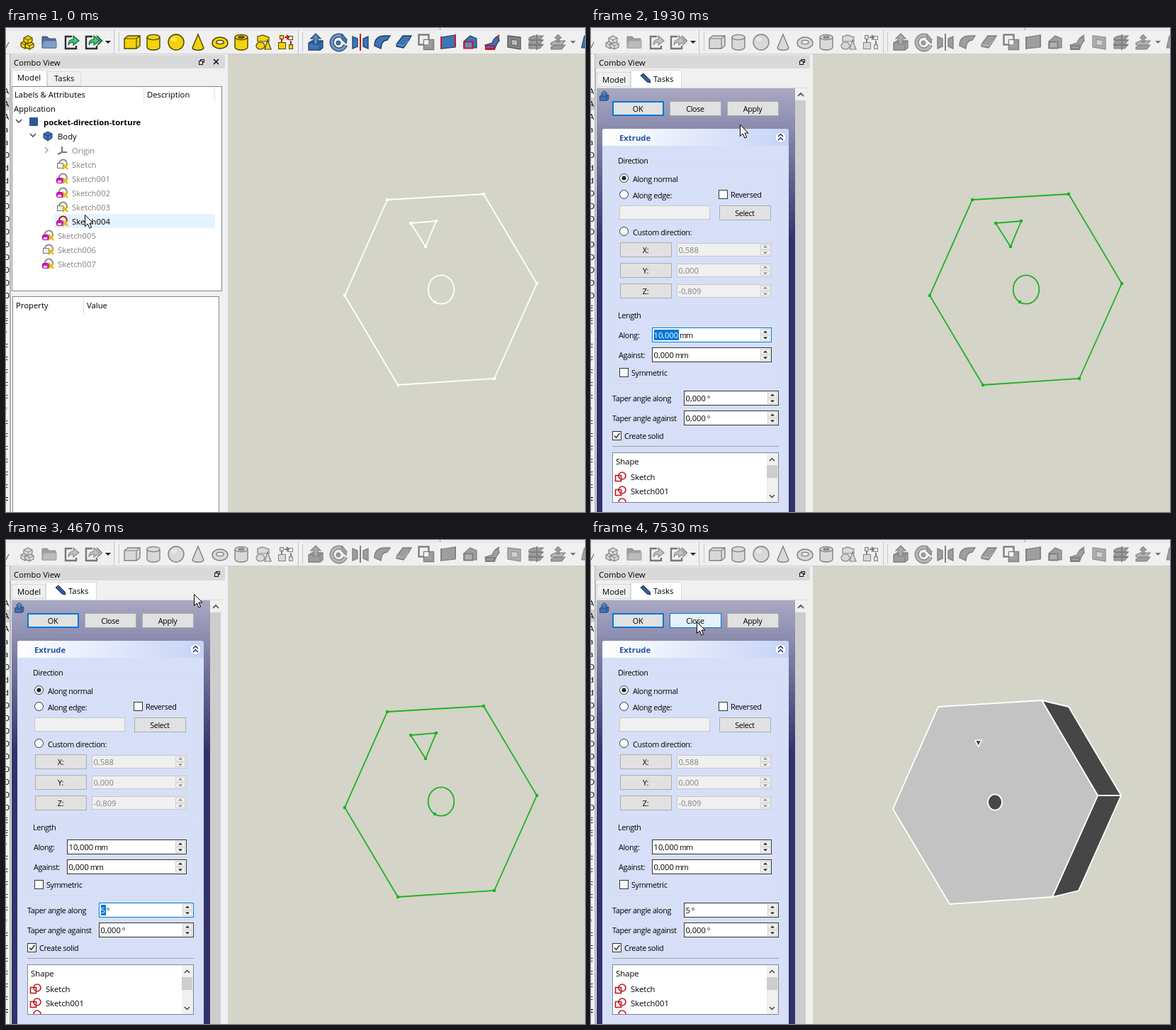
These frames come from a looping animation (817x682 px, 8 s). An HTML page:

```html
<!DOCTYPE html>
<html lang="en">
<head>
<meta charset="utf-8">
<title>Extrude with taper</title>
<style>
html, body { margin: 0; width: 100%; height: 100%; overflow: hidden; background: #f0f0f0; }
svg { display: block; width: 100%; height: 100%; }
text { font: 11.3px "Open Sans", "Noto Sans", sans-serif; fill: #000; white-space: pre; }
.p { font-size: 10.8px; letter-spacing: -.35px; }
.n { font-size: 11.2px; letter-spacing: 0; }
.u { letter-spacing: -1px; }
.b { font-weight: 700; }
.g { fill: #808080; }
.w { fill: #fff; }
.m { text-anchor: middle; }
.dim { filter: grayscale(1); opacity: .62; }
</style>
</head>
<body>
<svg id="stage" viewBox="0 0 817 682"></svg>
<script>
const LOOP = 8000, STEP = 200 / 3;
const BLUE = '#3f74b5', NAVY = '#1c3d68', GOLD = '#f2d20c', BROWN = '#4f4200', RED = '#d3131b';

// drawing helpers
const text = (x, y, s, c = '') => `<text x="${x}" y="${y}" class="${c}">${s}</text>`;
const group = (id, body, more = '') => `<g id="${id}" ${more}>${body}</g>`;
const at = (x, y, body, more = '') => `<g transform="translate(${x} ${y})" ${more}>${body}</g>`;
const path = (d, fill = 'none', stroke = 'none', w = 1, more = '') =>
  `<path d="${d}" fill="${fill}" stroke="${stroke}" stroke-width="${w}" ${more}/>`;
const poly = (pts, fill, stroke, w, more) => path(`M${pts}Z`, fill, stroke, w, more);
const oval = (x, y, rx, ry, fill = 'none', stroke = 'none', w = 1) =>
  `<ellipse cx="${x}" cy="${y}" rx="${rx}" ry="${ry}" fill="${fill}" stroke="${stroke}" stroke-width="${w}"/>`;
function rect(x, y, w, h, fill, stroke, more = '') {
  const o = stroke ? .5 : 0;
  return `<rect x="${x + o}" y="${y + o}" width="${w - 2 * o}" height="${h - 2 * o}" fill="${fill}" stroke="${stroke || 'none'}" ${more}/>`;
}
const tri = (x, y, s, up, fill = '#222') => poly(`${x - s} ${y}h${2 * s}l${-s} ${up ? -s : s}`, fill);

// toolbar icons, each centred on its own origin
const cube = (f, s) => path('M-11 -5L-6 -9H11L11 5 6 9H-11Z', f, s, 1.4) + path('M-11 -5H6L11 -9M6 -5V9', 'none', s, 1.2);
const can = (f, s) => path('M-9 -7V7A9 4 0 0 0 9 7V-7', f, s, 1.4) + oval(0, -7, 9, 3.6, f, s, 1.4);
const block = (x, y, f, s) => at(x, y, poly('0 -5L6 -2V3L0 6L-6 3V-2', f, s, 1.2) + path('M-6 -2L0 1L6 -2M0 1V6', 'none', s, 1));
const share = path('M1 -8H-8V9H7V5', 'none', '#2b2f33', 2.4) + path('M-4 4Q-4 -4 3 -4V-9L11 -2L3 4V0Q-2 0 -4 4Z', '#45c878', '#11633a', 1.2);
const slab = (y, f, s) => poly(`-10 ${y}L-4 ${y - 3}H10L5 ${y + 3}H-10`, f, s, 1.1);
const lift = path('M-10 1L-5 -2H10V8L6 11H-10Z', BLUE, NAVY, 1.3) + path('M-10 1H6V11M6 1L10 -2', 'none', NAVY)
  + poly('0 -12L7 -5H3V3H-3V-5H-7', '#5589c4', NAVY, 1.2);
const layers = c => [6, 0, -6].map(y => slab(y, BLUE, NAVY)).join('') + path('M-11 -3H10M-11 4H10M1 -11V11', 'none', c, 1.8);
const squares = c => rect(-11, -11, 15, 15, '#f0f0f0', c, 'stroke-width="2.4"') + rect(-4, -4, 15, 15, BLUE, NAVY, 'stroke-width="1.5"')
  + rect(-3, -3, 6, 6, '#f0f0f0');

const icons = [
  [30, block(-3, 3, GOLD, BROWN) + block(3, 4, GOLD, BROWN) + block(1, -4, GOLD, BROWN)],
  [61, path('M-10 8V-8H-3L0 -5H9V8Z', '#4d6f9e', '#42566e') + path('M-10 8L-8 -2H10V8Z', '#7f9fca', '#56739a')],
  [92, share],
  [121, share + path('M7 -9L14 -2L8 4', 'none', '#11633a', 2)],
  [178, cube(GOLD, BROWN)],
  [208, can(GOLD, BROWN)],
  [240, oval(0, 0, 11, 11, GOLD, BROWN, 1.4) + oval(-3, -4, 4, 3, '#fae75b')],
  [271, path('M0 -11L-8 8A8 3.2 0 0 0 8 8Z', GOLD, BROWN, 1.4)],
  [302, oval(0, 1, 11, 8, GOLD, BROWN, 1.4) + oval(0, 0, 5, 2.6, '#f0f0f0', BROWN, 1.4)],
  [332, can(GOLD, BROWN) + oval(0, -7, 4.5, 1.8, '#6d5c08', BROWN)],
  [364, path('M-9 -8L-2 -10L7 -7V-1H-9Z', GOLD, BROWN, 1.2) + oval(-5, 5, 6, 5, GOLD, BROWN, 1.2) + path('M1 10L5 -3L10 10Z', GOLD, BROWN, 1.2)],
  [395, rect(-11, 0, 11, 10, GOLD, BROWN) + rect(-9, -10, 6, 6, GOLD, BROWN) + rect(3, -9, 7, 6, '#eee', BROWN)
    + rect(4, 3, 6, 7, GOLD, BROWN) + path('M-2 -7H3M1 -10L4 -7L1 -4M7 -2V3M-6 -4V0', 'none', RED, 2)],
  [437, lift],
  [469, path('M4 -9A10 10 0 1 0 10 4', 'none', NAVY, 6) + path('M4 -9A10 10 0 1 0 10 4', 'none', '#6d98cc', 3.6)
    + oval(0, 1, 3, 3, BLUE, NAVY) + poly('5 -12L12 -4L11 2L4 -5', BLUE, NAVY)],
  [500, poly('-11 -8L-4 -5V6L-11 9', BLUE, NAVY, 1.3) + poly('11 -8L4 -5V6L11 9', BLUE, NAVY, 1.3) + path('M0 -12V12', 'none', RED, 2)],
  [531, path('M-11 3Q-10 -9 4 -9H11L7 -3Q-1 -3 -2 9L-11 5Z', BLUE, NAVY, 1.3)],
  [561, path('M-10 3L-1 -9H11L7 -2L0 8L-10 6Z', BLUE, NAVY, 1.3) + path('M-10 3L0 5L7 -2', 'none', '#7ba5d6')],
  [593, squares(RED), 'two'],
  [624, poly('-10 -7L10 -10V7L-10 9', BLUE, NAVY, 1.2) + path('M-10 -8V10M10 -11V7', 'none', RED, 1.8)],
  [655, poly('-9 -1L0 -9L9 -5V8H-9', BLUE, NAVY, 1.2) + rect(-9, -1, 13, 10, '#5f8fc7', RED, 'stroke-width="2"')],
  [686, path('M-10 4L0 1Q3 -8 9 -8L10 -2Q6 2 4 9H-9Z', BLUE, NAVY, 1.2) + path('M-9 5H3V10H-9ZM5 -6L10 -10', 'none', RED, 2)],
  [717, poly('-9 -9L9 -7V10L-9 7', '#888', '#555', 1.3) + poly('-4 -4L5 -3V5L-4 4', '#bbb', '#666', 1.3), 'off'],
  [748, layers(RED), 'two'],
  [779, slab(7, BLUE, NAVY) + slab(1, '#6d98cc', NAVY) + poly('0 -11L5 -6H2V0H-2V-6H-5', BLUE, NAVY), 'two'],
  [818, poly('-6 8L-2 -9L5 -9V8', BLUE, NAVY)],
];

const handle = x => Array.from({ length: 14 }, (_, i) => rect(x, 6 + i * 2, 1, 1, '#a0a0a0')).join('');
const toolbar = rect(0, 0, 817, 37, '#f0f0f0') + rect(0, 2, 817, 1, '#dcdcdc') + rect(612, 0, 1, 3, '#999')
  + rect(0, 36, 817, 1, '#cfcfcf') + rect(152, 3, 1, 33, '#c4c4c4') + rect(412, 3, 1, 33, '#c4c4c4') + handle(159) + handle(418)
  + group('toolHover', rect(423, 5, 31, 31, '#bddcf4'))
  + group('tools', icons.map(([x, body, kind]) => at(x, 20, body, `class="${kind || ''}"`)).join(''))
  + path('M0 28L4 20', 'none', '#444') + tri(144, 18, 4, false) + tri(800, 18, 4, false, '#777');

// window peeking out behind the dock
const letters = 'AAAaaDddDDDDDDDDDEEfFFFFFfFFFFFFF';
const behind = rect(0, 37, 5, 645, '#f1f3f3') + rect(0, 98, 5, 18, '#d0d0d0')
  + [...letters].map((c, i) => text(-3, 93 + i * 18, c, i == 32 ? 'b' : '')).join('')
  + rect(5, 37, 2, 645, '#b5b5b5') + rect(7, 37, 306, 645, '#f0f0f0');

const dock = rect(6, 38, 303, 19, '#d9d9d9') + text(11, 53, 'Combo View');
const floatIcon = x => rect(x - 2, 44, 6, 5, 'none', '#111') + rect(x - 4, 46, 6, 6, '#d9d9d9', '#111');

// model tab
const sketchIcon = (x, y, color) => at(x, y,
  path('M-4 0A5.5 5.5 0 1 1 6 2', 'none', color == 'hot' ? '#b01212' : '#8b8b8b', 2)
  + (color ? rect(-8, -1, 10, 8, '#d613c6', '#a0058f', 'rx="2"') + rect(-6, 3, 5, 3, '#fff') : rect(-7, -2, 9, 8, '#eee', '#777'))
  + path('M1 -1L8 7M8 0L1 7', 'none', '#e2b70b', 2.4));
const bodyIcon = (x, y) => at(x, y, poly('0 -6L6 -3V3L0 7L-6 3V-3', BLUE, NAVY) + path('M-6 -3L0 0L6 -3M0 0V7', 'none', NAVY));
const chevron = (x, y, open, c = '#333') => path(open ? `M${x - 4} ${y - 2}l4 4 4 -4` : `M${x - 2} ${y - 4}l4 4 -4 4`, 'none', c, 1.3);

const tree = rect(8, 82, 297, 289, '#fff', '#828790') + rect(194, 83, 1, 22, '#e2e2e2') + rect(294, 83, 1, 22, '#e2e2e2')
  + text(12, 98, 'Labels &amp; Attributes') + text(199, 98, 'Description') + text(11, 118, 'Application')
  + chevron(18, 131, true) + rect(33, 126, 12, 12, '#2f5796') + text(53, 137, 'pocket-direction-torture', 'b')
  + chevron(38, 151, true) + bodyIcon(59, 152) + text(73, 157, 'Body')
  + chevron(57, 172, false, '#999') + path('M79 167V175L73 178M79 175H86', 'none', '#777', 2) + text(93, 177, 'Origin', 'g')
  + rect(68, 262, 227, 20, '#e5f3ff', '', 'id="row"')
  + group('rowFocus', rect(69, 262, 125, 20, 'none', '#333', 'stroke-dasharray="1 1"'))
  + ['', '001', '002', '003', '004', '005', '006', '007'].map((n, i) => {
    const x = i < 5 ? 79 : 59, y = 192 + i * 20;
    return sketchIcon(x, y, i == 4 ? 'hot' : i % 3) + text(x + 14, y + 5, 'Sketch' + n, i == 4 ? '' : 'g');
  }).join('');

const props = [
  ['Attachment'], ['Support', ''], ['Map Mode', 'FlatFace'], ['Base'],
  ['Placement', '[(0,95 0,00 0,31); 180,000 °; (49,55...', 1], ['Label', 'Sketch004'], ['Sketch'],
  ['Constraints', '[30,000 mm;15,000 mm;4,000 m...', 1], ['External Ge...', ''],
];
const propRows = props.map(([name, value, more], i) => {
  const y = 402 + i * 20;
  if (value === undefined) return rect(10, y, 290, 19.5, '#a0a0a0') + text(33, y + 15, name, 'b w');
  return rect(30, y, 269, 20, i % 3 == 1 ? '#f5f5f5' : '#fff') + rect(10, y + 19, 290, 1, '#dcdcdc') + rect(109, y, 1, 20, '#dcdcdc')
    + (more ? chevron(19, y + 10, false, '#999') : '') + text(33, y + 15, name) + text(113, y + 15, value, 'p');
}).join('');

const model = floatIcon(276) + path('M293 44L300 51M300 44L293 51', 'none', '#111', 1.6)
  + rect(58, 61, 48, 21, '#f0f0f0', '#d9d9d9') + rect(8, 59, 50, 24, '#fff', '#d9d9d9') + text(16, 74, 'Model') + text(68, 75, 'Tasks')
  + tree + rect(9, 378, 292, 310, '#fff', '#828790') + rect(109, 380, 1, 22, '#dcdcdc')
  + text(14, 395, 'Property') + text(114, 395, 'Value') + group('propRows', propRows);

// tasks tab
const button = (x, y, label, id = '', h = 21) =>
  rect(x, y, 73, h, '#e1e1e1', '#adadad', `id="${id}"`) + text(x + 36, y + 15, label, 'p m');
const radio = (y, label, on) => oval(46.5, y, 6, 6, '#fff', '#333') + (on ? oval(46.5, y, 3, 3, '#222') : '') + text(59, y + 5, label, 'p');
const check = (x, y, label, on) => rect(x, y, 13, 13, '#fff', '#333')
  + (on ? path(`M${x + 3} ${y + 6.5}l2.5 3 5 -6.5`, 'none', '#222', 1.4) : '') + text(x + 17, y + 11, label, 'p');
const frame = (y, h, label) => rect(30, y, 235, h, 'none', '#d5dae6') + rect(36, y - 4, label.length * 5 + 2, 9, '#d6dff7') + text(38, y + 4, label, 'p');
function spin(x, y, w, num, unit, id = '', off = false) {
  const h = off ? 19 : 21, r = x + w - 16, ink = off ? '#888' : '#222';
  return rect(x, y, w, h, off ? '#f0f0f0' : '#fff', off ? '#c6c8ce' : '#333', id && `id="${id}"`)
    + rect(r, y + 2, 14, h / 2 - 2, '#f0f0f0', '#d0d0d0') + rect(r, y + h / 2, 14, h / 2 - 2, '#f0f0f0', '#d0d0d0')
    + tri(r + 7, y + h / 2 - 3, 3, true, ink) + tri(r + 7, y + h / 2 + 3, 3, false, ink)
    + rect(x + 3, y + 3, 35, 15, '#0078d7', '', id ? `id="${id}Sel"` : 'display="none"')
    + text(x + 2.5, y + (off ? 14 : 15), `<tspan class="n" ${id && `id="${id}Num"`}>${num}</tspan><tspan class="u"> ${unit}</tspan>`, off ? 'p g' : 'p');
}
const shapeIcon = y => rect(34, y - 2, 9, 9, 'none', '#c4161c', 'stroke-width="1.6"') + oval(44, y - 1, 5, 5, 'none', '#c4161c', 1.6);
const axes = ['X:0,588', 'Y:0,000', 'Z:-0,809'].map((s, i) =>
  button(41, 302 + 29 * i, s.slice(0, 2)) + spin(121, 303 + 29 * i, 134, s.slice(2), '', '', true)).join('');

const tasks = floatIcon(298)
  + rect(8, 62, 48, 21, '#f0f0f0', '#d9d9d9') + rect(56, 59, 72, 26, '#fff', '#d9d9d9') + text(16, 77, 'Model') + text(88, 76, 'Tasks')
  + poly('70 67L74 64L83 73L84 77L79 76', '#345f9d', '#172c4d')
  + rect(8, 84, 280, 598, 'url(#deep)') + rect(8, 84, 297, 1, '#d9d9d9')
  + rect(288, 85, 16, 597, '#f0f0f0') + rect(288, 102, 15, 580, '#cdcdcd') + path('M292 96l4 -4 4 4', 'none', '#444', 1.6)
  + button(30, 103, 'OK') + rect(30.5, 103.5, 72, 20, 'none', '#0078d7', 'stroke-width="2"')
  + button(111, 103, 'Close', 'close') + button(192, 103, 'Apply', 'apply')
  + path('M16 167V145Q16 142 19 142H276Q279 142 279 145V167Z', 'url(#head)') + rect(16, 166, 263, 516, '#d6dff7')
  + at(30, 154, lift, 'style="scale:.62"') + text(40, 159, 'Extrude', 'b" style="fill:#2153aa')
  + oval(267.5, 154, 7.5, 7.5, '#fff', '#b7c3e0') + path('M264 153l3.5 -3.5 3.5 3.5M264 158l3.5 -3.5 3.5 3.5', 'none', '#1c3272', 1.5)
  + frame(187, 206, 'Direction') + radio(211.5, 'Along normal', true) + radio(234.5, 'Along edge:') + check(180, 228, 'Reversed')
  + rect(40, 250, 128, 20, '#f0f0f0', '#c6c8ce') + button(181, 250, 'Select') + radio(286.5, 'Custom direction:') + axes
  + frame(405, 97, 'Length') + text(39, 437, 'Along:', 'p') + text(39, 465, 'Against:', 'p')
  + spin(86, 422, 169, '10,000', 'mm', 'along') + spin(86, 450, 169, '0,000', 'mm') + check(40, 479, 'Symmetric')
  + text(30, 526, 'Taper angle along', 'p') + spin(131, 511, 134, '0,000', '°', 'taper')
  + text(30, 554, 'Taper angle against', 'p') + spin(131, 539, 134, '0,000', '°') + check(30, 568, 'Create solid', true)
  + rect(30, 589, 235, 1, '#a0a0a0') + rect(30, 598, 235, 71, '#fff', '#828790') + rect(248, 599, 16, 69, '#f0f0f0') + rect(248, 616, 15, 18, '#cdcdcd')
  + path('M252 610l3.5 -3.5 3.5 3.5M252 658l3.5 3.5 3.5 -3.5', 'none', '#444', 1.5)
  + text(35, 615, 'Shape') + shapeIcon(632) + text(56, 637, 'Sketch') + shapeIcon(652) + text(56, 657, 'Sketch001')
  + path('M39 668A5 5 0 0 1 49 668', 'none', '#c4161c', 1.6);

// 3D view
const corners = [[538, 242], [674, 234], [749, 360], [689, 494], [553, 503], [478, 377]];
const notch = [[571, 275], [607, 272], [592, 308]];
const dots = [...corners, ...notch, [605, 386]].map(([x, y]) => `M${x - 2} ${y - 2}h4v4h-4z`).join('');
const sketch = group('sketch', path(`M${corners.join('L')}ZM${notch.join('L')}Z`, 'none', 'currentColor', 1.8)
  + oval(614, 368.5, 18.3, 20.2, 'none', 'currentColor', 1.8) + path(dots, 'currentColor'));
const edge = 'stroke-linejoin="round"';
const solid = group('solid', poly('636 226L674 235L748 360H715', '#464646', '#fff', 1.8, edge)
  + poly('715 360H748L688 494L651 503', '#464646', '#fff', 1.8, edge)
  + poly('490 235L636 226L715 360L651 503L506 513L426 379', '#c3c3c3', '#fff', 1.8, edge)
  + oval(570, 369.5, 10, 11.2, '#484848', '#fff', 1.8) + poly('542 282.5L551 282L546.8 291', '#464646', '#fff', 1.6));

const pointer = group('arrow', path('M.5 .5V16.5L4.3 13L7 19L9.6 18L7 12H12Z', '#fff', '#000'))
  + group('busy', oval(0, 0, 7.3, 7.3, '#9ed2f5', '#1479cf', 4.4) + path('M0 -7.3A7.3 7.3 0 0 1 7.3 0', 'none', '#5db4f0', 3.2));

const stage = document.getElementById('stage');
stage.innerHTML = `<defs>
  <linearGradient id="deep" gradientUnits="userSpaceOnUse" x1="0" y1="85" x2="0" y2="300"><stop stop-color="#a9a9c4"/><stop offset="1" stop-color="#32326c"/></linearGradient>
  <linearGradient id="head"><stop stop-color="#fff"/><stop offset="1" stop-color="#c6d3f7"/></linearGradient></defs>`
  + rect(313, 37, 504, 645, '#d4d4c8') + toolbar + behind + dock + group('model', model) + group('tasks', tasks) + sketch + solid + pointer;

// timeline
const T = { pick: 266, open: 1600, step: 3733, press: 5400, built: 5800, done: 5930 };
const moves = [
  [0, 111, 263], [133, 104, 269], [400, 104, 269], [1067, 440, 23], [1200, 433, 20], [1600, 433, 20],
  [1933, 210, 136], [2200, 222, 112], [2733, 191, 578], [3067, 150, 535], [3200, 124, 530], [3400, 240, 440],
  [3533, 254, 515], [4000, 254, 515], [4467, 262, 97], [4600, 270, 72], [4933, 222, 113], [5067, 221, 113],
  [6933, 221, 113], [7533, 149, 115], [LOOP, 149, 115],
];
const clamp = v => Math.max(0, Math.min(1, v));
const ramp = (t, a, b) => clamp((t - a) / (b - a));
const $ = id => document.getElementById(id);
const show = (id, on) => { $(id).style.display = on ? '' : 'none'; };
const paint = (id, fill, stroke) => { $(id).setAttribute('fill', fill); if (stroke) $(id).setAttribute('stroke', stroke); };
const focusInk = k => `rgb(${51 - 51 * k},${51 + 69 * k},${51 + 164 * k})`;

function cursorAt(t) {
  const i = Math.max(1, moves.findIndex(m => m[0] > t));
  const [a, x, y] = moves[i - 1], [b, u, v] = moves[i];
  const k = ramp(t, a, b), e = k * k * (3 - 2 * k);
  return [Math.round(x + (u - x) * e), Math.round(y + (v - y) * e)];
}

function draw(ms) {
  const t = Math.floor((ms + 5) / STEP) * STEP + 1;
  const [x, y] = cursorAt(t);
  const picked = t >= T.pick, open = t >= T.open, stepped = t >= T.step;
  const pressed = t >= T.press && t < T.built, busy = t >= T.press && t < T.done, built = t >= T.built;
  const over = left => x >= left && x < left + 73 && y >= 103 && y < 124;

  show('model', !open);
  show('tasks', open);
  show('propRows', picked);
  show('rowFocus', picked);
  paint('row', picked ? '#cce8ff' : '#e5f3ff');
  show('toolHover', !open && x >= 423 && x < 454 && y < 36);
  $('tools').setAttribute('class', open ? 'dim' : '');
  for (const g of stage.querySelectorAll('.two')) g.style.filter = picked ? '' : 'grayscale(1) opacity(.65)';

  for (const [id, left] of [['close', 111], ['apply', 192]]) {
    const hit = over(left);
    if (hit && pressed) paint(id, '#cce4f7', '#005499');
    else paint(id, hit ? '#e5f1fb' : '#e1e1e1', hit ? '#0078d7' : '#adadad');
  }
  paint('along', '#fff', focusInk(1 - ramp(t, T.step, 4450)));
  paint('taper', '#fff', focusInk(ramp(t, T.step, 4600) * (1 - ramp(t, T.press + 100, T.done))));
  show('alongSel', !stepped);
  $('alongNum').style.fill = stepped ? '' : '#fff';
  const marked = stepped && t < T.press;
  show('taperSel', marked);
  $('taperSel').setAttribute('width', 7);
  $('taperNum').textContent = stepped ? '5' : '0,000';
  $('taperNum').style.fill = marked ? '#fff' : '';

  show('sketch', !built);
  show('solid', built);
  $('sketch').style.color = picked ? '#1fb224' : '#fff';
  show('arrow', !busy);
  show('busy', busy);
  $('arrow').setAttribute('transform', `translate(${x} ${y})`);
  $('busy').setAttribute('transform', `translate(${x + 2} ${y}) rotate(${t * .36})`);
}

const start = performance.now();
function tick() {
  draw((performance.now() - start) % LOOP);
  requestAnimationFrame(tick);
}
tick();
</script>
</body>
</html>
```
